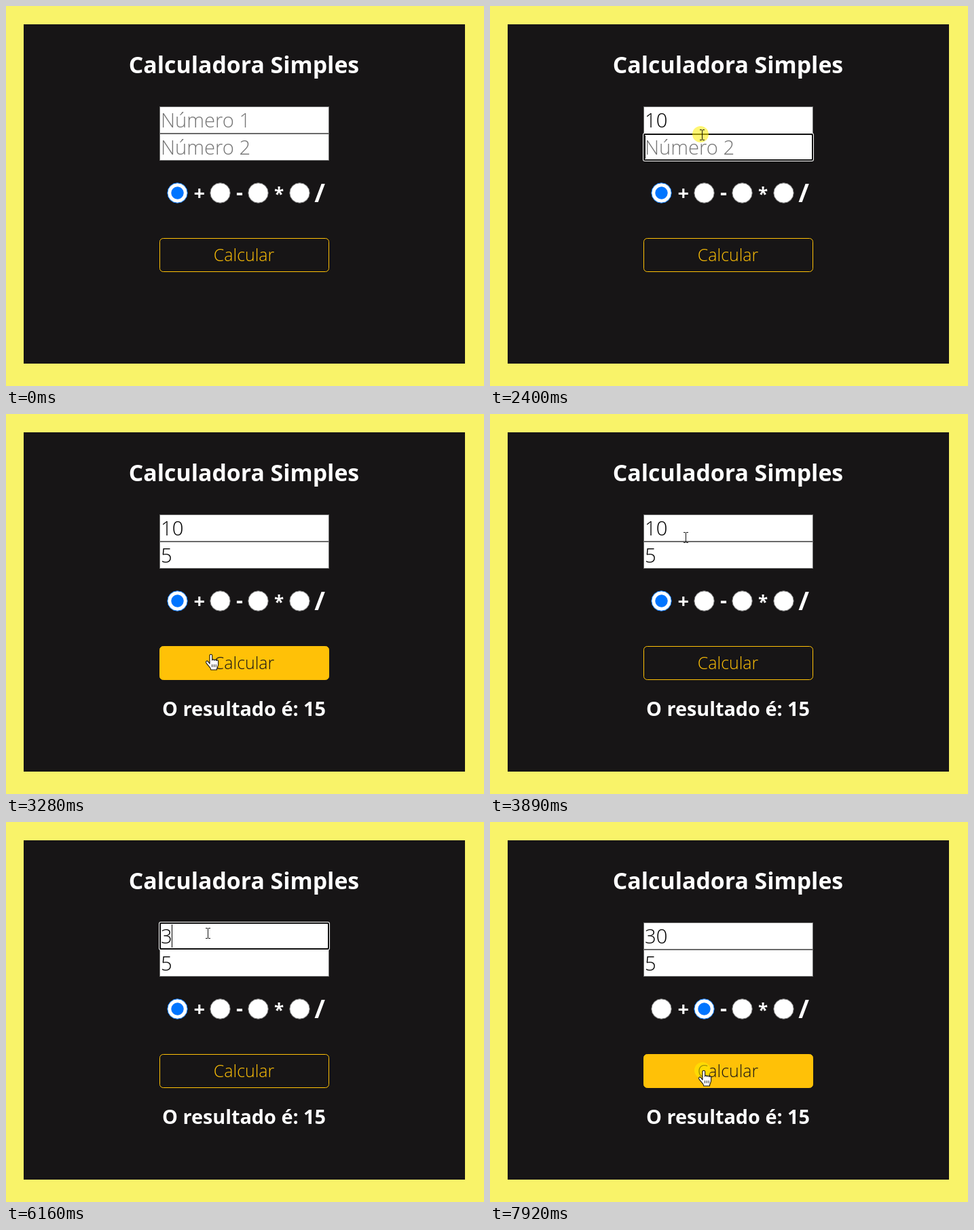
Animation, 704 px wide and 560 px high, one loop 8000 ms. Source, as an HTML page:

```html
<!DOCTYPE html>
<html lang="pt">
<head>
<meta charset="utf-8">
<title>Calculadora Simples</title>
<style>
  html, body { margin: 0; width: 100%; height: 100%; overflow: hidden; background: #f9f369; }
  svg { display: block; width: 704px; height: 560px; }
  text { font-family: "Open Sans", "Noto Sans", sans-serif; }
  .bold { font-weight: 700; fill: #fff; text-anchor: middle; }
  .light { font-weight: 300; }
</style>
</head>
<body>
<svg id="stage" viewBox="0 0 704 560">
  <rect width="704" height="560" fill="#f9f369"/>
  <rect x="26" y="27" width="650" height="500" fill="#171516"/>
  <text class="bold" x="350.5" y="99" font-size="33.8">Calculadora Simples</text>
  <g id="fields"></g>
  <g id="radios"></g>
  <rect id="button" x="226.5" y="342.5" width="249" height="49" rx="5" fill="#ffc107" stroke="#ffc107"/>
  <text id="label" class="light" x="350.5" y="376" font-size="24.9" text-anchor="middle">Calcular</text>
  <text id="result" class="bold" x="350.5" y="445" font-size="28.8">O resultado é: 15</text>
  <circle id="halo" r="12" fill="#ffee00" fill-opacity=".55"/>
  <g id="cursor" stroke-linejoin="round">
    <path id="arrow" d="M0 0V16L3.7 12.6 6 18.5 9 17.3 6.5 11.6H11.5Z" fill="#fff" stroke="#111" stroke-width=".8"/>
    <g id="hand" fill="#fff" stroke="#111" stroke-width="1.1">
      <path d="M-1 14V2a1.8 1.8 0 0 1 3.6 0V9c0-2 3-1.8 3 .2 .2-1.8 3-1.6 3 .4 .3-1.6 3-1.2 3 .8V15c0 3-2 4-2.2 8H.8C.5 19-3 17.5-6 13c-1.5-2.4.8-4 2.5-2.4Z"/>
      <path d="M2.6 15v4M5.4 15v4M8.2 15v4" stroke-width=".9"/>
    </g>
    <path id="beam" d="M-1.5 -6.5H1.5M2.5 -6.5H5.5M2 -6V8M-1.5 8.5H1.5M2.5 8.5H5.5" fill="none" stroke="#111"/>
  </g>
</svg>
<script>
const LOOP = 8000, TICK = 67.05, BLINK = 535;
const $ = id => document.getElementById(id);
const within = (t, spans) => spans.some(([a, b]) => t >= a && t < b);
const last = (t, list) => list.filter(e => e[0] <= t).pop();
const show = (el, on) => el.setAttribute('visibility', on ? 'visible' : 'hidden');

function add(parent, tag, attrs) {
  const el = document.createElementNS('http://www.w3.org/2000/svg', tag);
  for (const k in attrs) el.setAttribute(k, attrs[k]);
  return parent.appendChild(el);
}

// Edits are [time, value]; focus spans are [start, end].
const fields = [
  { y: 148, hint: 'Número 1', focus: [[670, 2400], [4030, 7230]],
    edits: [[0, ''], [1340, '1'], [1410, '10'], [4840, '1'], [5100, ''], [6160, '3'], [6300, '30']] },
  { y: 188, hint: 'Número 2', focus: [[2400, 3210]],
    edits: [[0, ''], [2670, '5']] }
];

for (const f of fields) {
  add($('fields'), 'rect', { x: 226.5, y: f.y + .5, width: 249, height: 39, fill: '#fff', stroke: '#6b6b6b' });
}
for (const f of fields) {
  const g = $('fields');
  f.ring = add(g, 'g', {});
  add(f.ring, 'rect', { x: 225, y: f.y - 1, width: 252, height: 42, rx: 3, fill: '#fff' });
  add(f.ring, 'rect', { x: 226, y: f.y, width: 250, height: 40, rx: 2, fill: '#101010' });
  add(f.ring, 'rect', { x: 228, y: f.y + 2, width: 246, height: 36, rx: 1, fill: '#fff' });
  f.text = add(g, 'text', { class: 'light', x: 228, y: f.y + 31, 'font-size': 29.2 });
  f.caret = add(g, 'rect', { y: f.y + 3, width: 1, height: 34, fill: '#000' });
}

// x of the radio, sign, x of the sign, baseline, size
const radios = [
  [252.5, '+', 284.8, 286, 29],
  [315.5, '-', 344, 285, 31],
  [371.5, '*', 402, 286.5, 26],
  [432.5, '/', 462, 289, 38]
].map(([x, sign, sx, y, size]) => {
  const g = $('radios');
  const ring = add(g, 'circle', { cx: x, cy: 275.5, r: 14.7, fill: '#fff' });
  const dot = add(g, 'circle', { cx: x, cy: 275.5, r: 9.2, fill: '#0075ff' });
  add(g, 'text', { class: 'bold', x: sx, y, 'font-size': size }).textContent = sign;
  return { ring, dot };
});

// Pointer stops: time, x, y
const path = [
  [70, 562, 511], [600, 291, 179], [1990, 291, 179], [2200, 310, 189],
  [2650, 310, 189], [3130, 300, 354], [3560, 300, 354], [3870, 286, 181],
  [4010, 295, 163], [6830, 295, 163], [7200, 314, 277], [7425, 314, 277],
  [7562, 315, 302], [7629, 314, 346], [7760, 313, 366], [LOOP, 313, 366]
];
const clicks = [[670, 810], [2400, 2540], [3210, 3280], [4030, 4170], [7230, 7370], [7900, LOOP]];
const hovers = [[320, 390], [3040, 3680], [7640, LOOP + 200]];

function pointer(t) {
  const time = Math.floor((t + 15) / TICK) * TICK - 15;
  const i = path.findIndex(p => p[0] > time);
  if (i < 1) return [path[0][1], path[0][2]];
  const [a, b] = [path[i - 1], path[i]];
  const u = (time - a[0]) / (b[0] - a[0]), s = u * u * (3 - 2 * u);
  return [a[1] + (b[1] - a[1]) * s, a[2] + (b[2] - a[2]) * s];
}

function hoverLevel(t) {
  const ramp = d => Math.max(0, Math.min(1, d / 150));
  return Math.max(...hovers.map(([a, b]) =>
    Math.min(ramp(t - a), ramp(b - a) - ramp(t - b))));
}

const mix = (a, b, k) => `rgb(${a.map((v, i) => Math.round(v + (b[i] - v) * k))})`;

function drawField(f, t) {
  const [editTime, value] = last(t, f.edits);
  const focused = within(t, f.focus);
  f.text.textContent = value || f.hint;
  f.text.setAttribute('fill', value ? '#000' : '#757575');
  show(f.ring, focused);
  const start = focused ? Math.max(editTime, last(t, f.focus)[0]) : 0;
  show(f.caret, focused && (t - start) % (2 * BLINK) < BLINK);
  f.caret.setAttribute('x', Math.floor(228 + 16.5 * value.length));
}

function drawPointer(t) {
  const [x, y] = pointer(t);
  const inside = (top, bottom) => x >= 226 && x <= 476 && y >= top && y <= bottom;
  const seen = t >= 260;
  const kind = inside(148, 228) ? 'beam' : inside(348, 392) ? 'hand' : 'arrow';
  const dx = kind === 'beam' ? .5 : kind === 'hand' ? 1 : 0;
  $('cursor').setAttribute('transform', `translate(${Math.round(x) + dx} ${Math.round(y)})`);
  for (const id of ['arrow', 'hand', 'beam']) show($(id), seen && id === kind);
  $('halo').setAttribute('cx', x);
  $('halo').setAttribute('cy', y);
  show($('halo'), within(t, clicks));
}

function draw(t) {
  fields.forEach(f => drawField(f, t));
  const picked = t < 7300 ? 0 : 1;
  radios.forEach((r, i) => {
    r.ring.setAttribute('stroke', i === picked ? '#0075ff' : '#767676');
    show(r.dot, i === picked);
  });
  const k = hoverLevel(t);
  $('button').setAttribute('fill-opacity', k);
  $('label').setAttribute('fill', mix([255, 193, 7], [23, 21, 22], k));
  show($('result'), t >= 3280);
  drawPointer(t);
}

const begin = performance.now();
function loop() {
  draw((performance.now() - begin) % LOOP);
  requestAnimationFrame(loop);
}
loop();
</script>
</body>
</html>
```
